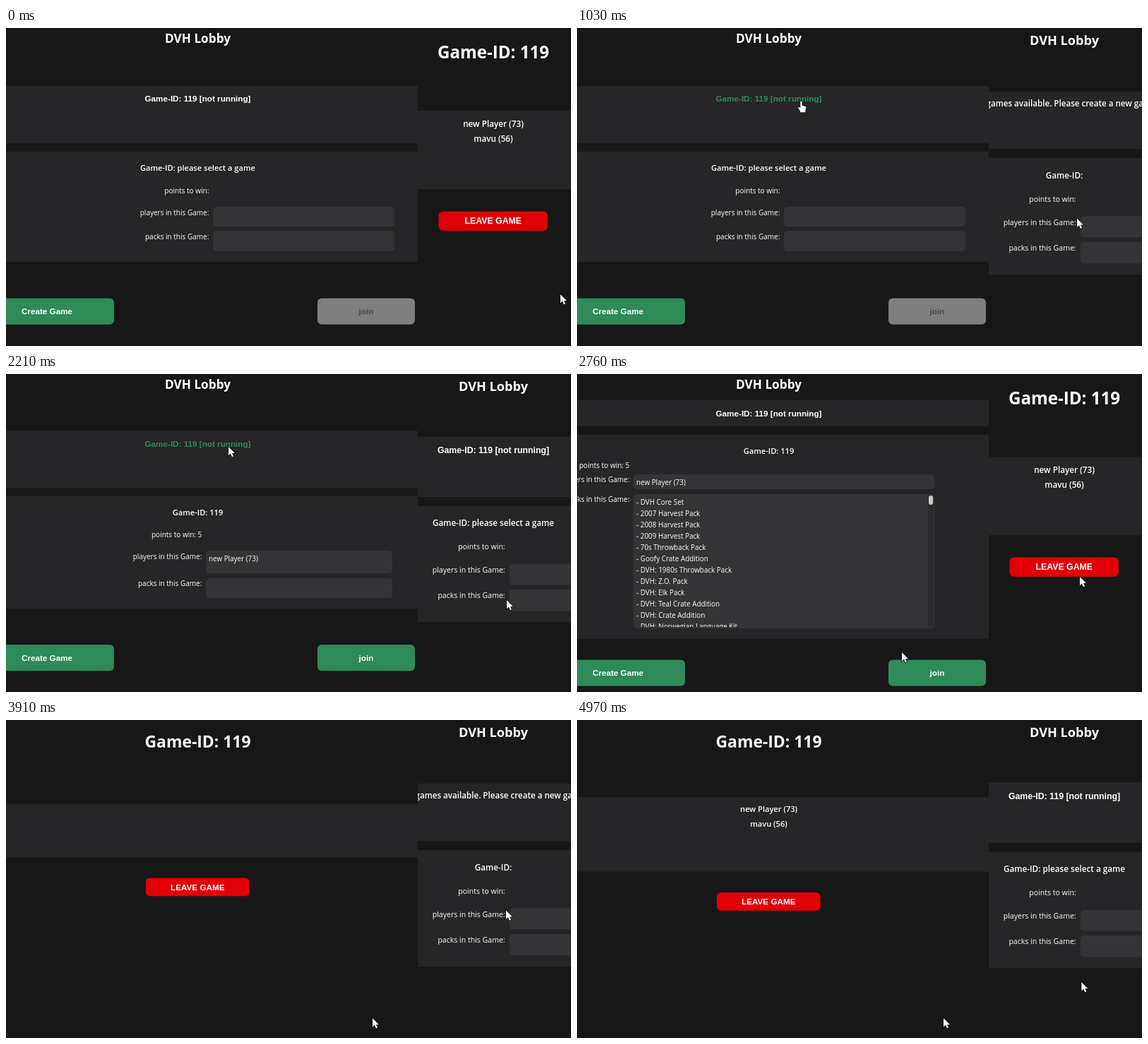
Write an HTML page with a canvas that moves like this. It is 800 by 450 pixels and loops after 5000 ms.

```html
<!DOCTYPE html>
<html lang="en">
<head>
<meta charset="utf-8">
<title>Lobby</title>
<style>
  html, body { margin: 0; width: 100%; height: 100%; overflow: hidden; background: #181718; }
  canvas { display: block; }
</style>
</head>
<body>
<canvas width="800" height="450"></canvas>
<script>
const ctx = document.querySelector('canvas').getContext('2d');
const LOOP = 5000, SPLIT = 583, MID = 271.5, SECOND_LAP = 2560;
const BG = '#181718', PANEL = '#262527', INPUT = '#343335';
const GREEN = '#2e8b57', RED = '#e10006', WHITE = '#fff', DARK = '#1c1414';
const UI = '"Open Sans", sans-serif', ARIAL = '"Liberation Sans", Arial, sans-serif';
const GAME = 'Game-ID: 119', OPEN_GAME = GAME + ' [not running]';
const PLAYERS = ['new Player (73)', 'mavu (56)'];
const PACKS = ['DVH Core Set', '2007 Harvest Pack', '2008 Harvest Pack', '2009 Harvest Pack',
  '70s Throwback Pack', 'Goofy Crate Addition', 'DVH: 1980s Throwback Pack', 'DVH: Z.O. Pack',
  'DVH: Elk Pack', 'DVH: Teal Crate Addition', 'DVH: Crate Addition', 'DVH: Norwegian Language Kit'];

// Vertical positions and input columns of the lobby in its different states
const FRESH = { bar: [82, 163], barText: 100, box: [175, 331], head: 198, rows: [230, 261, 295],
  inputs: [[253, 281], [287, 316]], x: [293, 550], button: 382.5 };
const NO_GAMES = { bar: [83.5, 160.5], barText: 99.5, box: [172.5, 329], head: 195.7, rows: [227.3, 258.7, 293],
  inputs: [[250.5, 279], [285, 314]], x: [293, 550], button: 382.5 };
const SELECTED = { bar: [80.5, 161], barText: 98.7, box: [173, 332], head: 196, rows: [227, 258, 296.5],
  inputs: [[250, 282], [289, 317]], x: [283, 547], button: 383 };
const EXPANDED = { bar: [37, 74], barText: 55.5, box: [86, 375], head: 109, rows: [129, 149, 177],
  inputs: [[142, 163], [170, 360]], x: [80, 506], button: 404.5 };

// Pointer paths: time, x, y
const LEFT_PATH = [[60, -20, 330], [300, 150, 220], [520, 290, 130], [680, 316, 104], [2240, 315, 103],
  [2600, 460, 394], [2770, 460, 394], [2940, 494, 396], [3050, 494, 396], [3110, 519, 422]];
const RIGHT_PATH = [[0, 785, 377], [40, 785, 377], [195, 712, 287], [490, 712, 287], [545, 708, 269.5],
  [1770, 708, 269.5], [1930, 743, 296], [2150, 709, 320], [2215, 709, 320], [2280, 709, 333],
  [2380, 709, 333], [2408, 714, 371], [2480, 785, 377]];

function text(str, x, y, size, { align = 'center', color = WHITE, weight = 600, font = UI } = {}) {
  ctx.font = `${weight} ${size}px ${font}`;
  ctx.textAlign = align;
  ctx.fillStyle = color;
  ctx.fillText(str, x, y + size * 0.36);
}

function rect(x1, y1, x2, y2, color, radius = 0) {
  ctx.fillStyle = color;
  ctx.beginPath();
  ctx.roundRect(x1, y1, x2 - x1, y2 - y1, radius);
  ctx.fill();
}

const panel = ([top, bottom]) => rect(-100, top, 700, bottom, PANEL);

function button(label, x1, x2, y, height, fill, color = WHITE) {
  rect(x1, y, x2, y + height, fill, 6);
  text(label, (x1 + x2) / 2, y + height / 2, 11.7, { color, weight: 700, font: ARIAL });
}

function packList([x1, x2], [top, bottom]) {
  ctx.save();
  ctx.beginPath();
  ctx.rect(x1, top, x2 - x1, bottom - top - 2);
  ctx.clip();
  PACKS.forEach((name, i) => text('- ' + name, x1 + 4, top + 11 + 16 * i, 9.9, { align: 'left', weight: 400 }));
  ctx.restore();
  rect(x2 - 9, top + 1, x2 - 1, bottom - 2, '#2b2a2c');
  rect(x2 - 8, top + 2, x2 - 2, top + 15, '#cacaca', 3);
}

function lobby(layout, { hover, joinHover } = {}) {
  const { bar, barText, box, head, rows, inputs, x } = layout;
  const chosen = layout === SELECTED || layout === EXPANDED;
  text('DVH Lobby', MID, 14.5, 17.2, { weight: 700 });
  panel(bar);
  if (layout === NO_GAMES) text('No games available. Please create a new game', MID, barText, 11);
  else text(OPEN_GAME, MID, barText, 11.7, { color: hover ? GREEN : WHITE, weight: 700, font: ARIAL });
  panel(box);
  text(layout === NO_GAMES ? 'Game-ID:' : chosen ? GAME : 'Game-ID: please select a game', MID, head, 11.1);
  const labels = ['points to win:' + (chosen ? ' 5' : ''), 'players in this Game:', 'packs in this Game:'];
  labels.forEach((label, i) => text(label, x[0] - 5.7, rows[i], 10, { align: 'right', weight: 400 }));
  inputs.forEach(([top, bottom]) => rect(x[0], top, x[1], bottom, INPUT, 5));
  if (chosen) text(PLAYERS[0], x[0] + 4, inputs[0][0] + 11, 9.9, { align: 'left', weight: 400 });
  if (layout === EXPANDED) packList(x, inputs[1]);
  button('Create Game', -37, 153, layout.button, 37, GREEN);
  button('join', 441, 579, layout.button, 37, chosen ? GREEN : '#807f80',
    chosen ? (joinHover ? DARK : WHITE) : '#4c4b4c');
}

function game(hasPlayers, hover) {
  text(GAME, MID, 31, 22.9, { weight: 700 });
  panel(hasPlayers ? [109.3, 214.5] : [119.3, 194.3]);
  if (hasPlayers) PLAYERS.forEach((name, i) => text(name, MID, 126.4 + 20.5 * i, 11.1));
  button('LEAVE GAME', 198, 344.5, hasPlayers ? 244 : 223.4, 25.8, RED, hover ? DARK : WHITE);
}

function along(path, t) {
  const next = path.findIndex(key => key[0] > t);
  if (next === 0) return path[0].slice(1);
  if (next < 0) return path.at(-1).slice(1);
  const [t0, x0, y0] = path[next - 1], [t1, x1, y1] = path[next];
  const u = (t - t0) / (t1 - t0), k = u * u * (3 - 2 * u);
  return [x0 + (x1 - x0) * k, y0 + (y1 - y0) * k];
}

const ARROW = new Path2D('M0 0V12.3L2.9 9.6L4.9 14.2L7 13.2L5 8.9H8.9Z');
const HAND = new Path2D('M.4 .6Q1.6-.8 2.8 .6V5.8L7 6.8Q8.6 7.2 8.4 8.8L7.6 12.8V15.3H.1V13.3L-2.8 9.4Q-2.6 7.4-1.2 8.2L.4 9.6Z');

function pointer([x, y], hand) {
  const shape = hand ? HAND : ARROW;
  ctx.save();
  ctx.translate(x, y);
  ctx.lineWidth = 1.4;
  ctx.strokeStyle = '#111';
  ctx.stroke(shape);
  ctx.fillStyle = WHITE;
  ctx.fill(shape);
  ctx.restore();
}

function drawLeft(t) {
  if (t < 3820) {
    const layout = t < 1900 ? FRESH : t < 2300 ? SELECTED : EXPANDED;
    lobby(layout, { hover: t > 640 && t < 2300, joinHover: t > 3080 });
  } else game(t > 4400);
  pointer(along(LEFT_PATH, t), (t > 640 && t < 1900) || (t > 3080 && t < 3600));
}

function drawRight(t) {
  ctx.save();
  ctx.translate(690, 2);
  ctx.scale(1.055, 1.055);
  ctx.translate(-MID, 0);
  if (t < 1020 || t > 2480) game(true, t > 525 && t < 1020);
  else lobby(t < 1620 ? NO_GAMES : FRESH);
  ctx.restore();
  pointer(along(RIGHT_PATH, t), t > 525 && t < 785);
}

function half(x, width, draw, t) {
  ctx.save();
  ctx.beginPath();
  ctx.rect(x, 0, width, 450);
  ctx.clip();
  ctx.fillStyle = BG;
  ctx.fillRect(x, 0, width, 450);
  draw(t);
  ctx.restore();
}

function frame() {
  const t = performance.now() % LOOP;
  half(0, SPLIT, drawLeft, t);
  half(SPLIT, 800 - SPLIT, drawRight, t % SECOND_LAP);
  requestAnimationFrame(frame);
}
frame();
</script>
</body>
</html>
```
